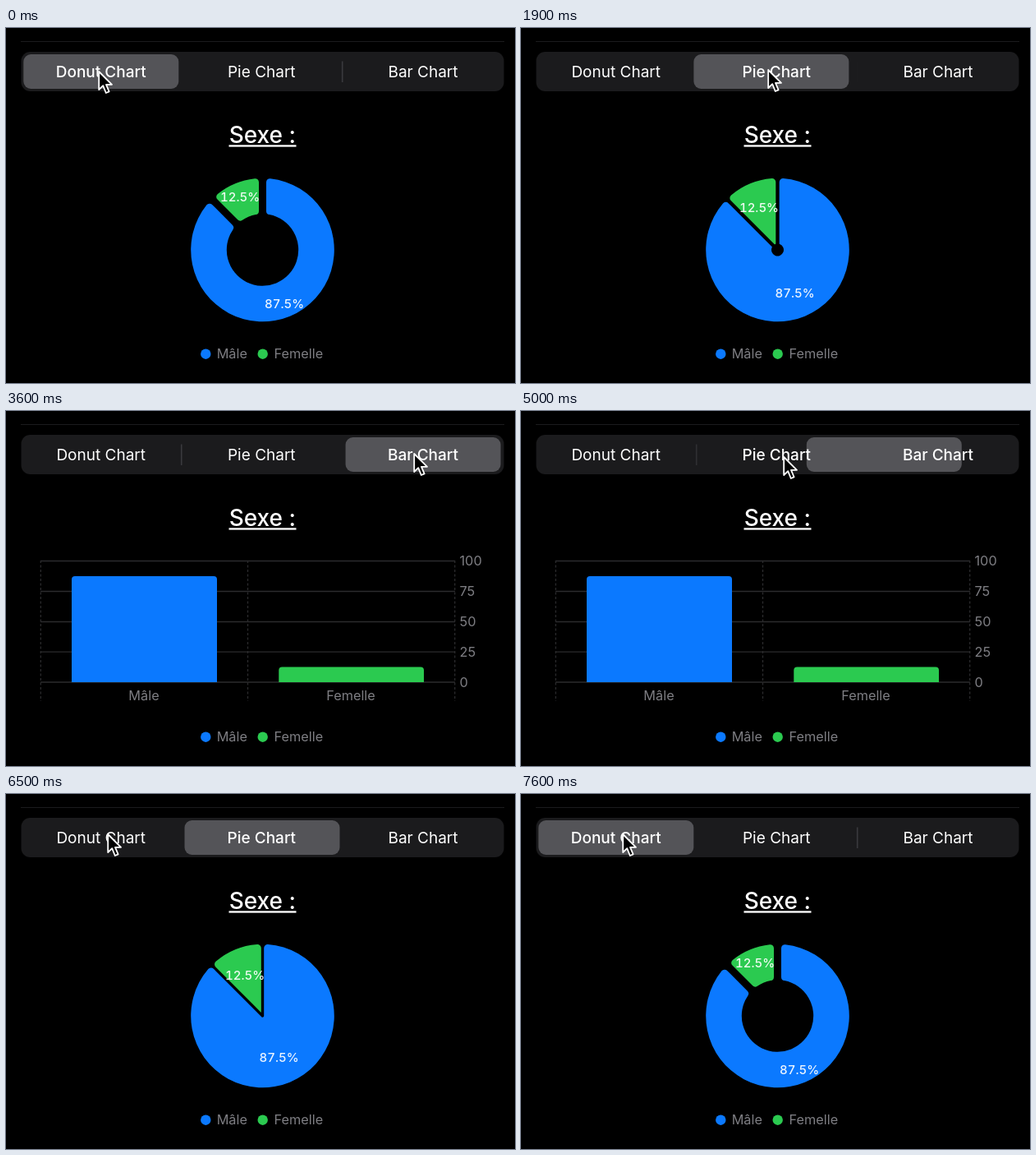
These frames come from a looping animation (620x432 px, 8500 ms). An HTML page:

```html
<!DOCTYPE html>
<html lang="fr">
<head>
<meta charset="utf-8">
<title>Chart picker</title>
<style>
  html, body { margin: 0; width: 100%; height: 100%; overflow: hidden; background: #000; }
  svg { display: block; width: 620px; height: 432px; font-family: Inter, Roboto, sans-serif; }
  text { text-anchor: middle; fill: #fff; }
  .tab { font-size: 19px; }
  .title { font-size: 28px; font-weight: 500; }
  .value { font-size: 15px; font-weight: 500; font-variant-numeric: tabular-nums; fill-opacity: .92; }
  .note { font-size: 16.3px; fill: #7e7e83; }
  .left { text-anchor: start; }
  .grid { stroke: #2b2b2d; stroke-width: 1.3; fill: none; }
  .dash { stroke-dasharray: 3 2.5; }
  .blue { fill: #0b79ff; }
  .green { fill: #2bca50; }
</style>
</head>
<body>
<svg viewBox="0 0 620 432">
  <rect width="620" height="432"/>
  <path d="M18 16.5H607" stroke="#1b1b1d"/>
  <rect x="18.5" y="29" width="588" height="48" rx="11" fill="#1b1b1d"/>
  <g stroke="#3a3a3e" stroke-width="1.6">
    <path id="divLeft" d="M213.7 40.5V66"/>
    <path id="divRight" d="M409.7 40.5V66"/>
  </g>
  <rect id="pill" y="32" width="189" height="42" rx="9" fill="#545458"/>
  <text class="tab" x="115.7" y="60">Donut Chart</text>
  <text class="tab" x="311.3" y="60">Pie Chart</text>
  <text class="tab" x="508" y="60">Bar Chart</text>

  <text class="title" x="312.3" y="139.5">Sexe :</text>
  <rect x="271.5" y="142.3" width="82" height="2.3" fill="#fff"/>

  <g id="bars">
    <path class="grid" d="M42 182.5H547M42 219.5H547M42 256.5H547M42 293.2H547M42 330H547"/>
    <path class="grid dash" d="M42.3 182V353M294.5 182V353M546.7 182V353"/>
    <path class="blue" d="M80 330V205q0-4 4-4H253q4 0 4 4V330z"/>
    <path class="green" d="M332.3 330V315.5q0-4 4-4H505q4 0 4 4V330z"/>
    <g class="note">
      <text class="note left" x="552.5" y="188.4">100</text>
      <text class="note left" x="552.5" y="225.2">75</text>
      <text class="note left" x="552.5" y="262.1">50</text>
      <text class="note left" x="552.5" y="299">25</text>
      <text class="note left" x="552.5" y="335.8">0</text>
    </g>
    <text class="note" x="168" y="351.5">Mâle</text>
    <text class="note" x="420" y="351.5">Femelle</text>
  </g>

  <g id="round">
    <path id="male" class="blue"/>
    <path id="female" class="green"/>
    <text id="maleValue" class="value">87.5%</text>
    <text id="femaleValue" class="value">12.5%</text>
  </g>

  <circle class="blue" cx="243.3" cy="396.7" r="6.2"/>
  <text class="note" x="275.3" y="402.3">Mâle</text>
  <circle class="green" cx="312.7" cy="396.7" r="6.2"/>
  <text class="note" x="356.4" y="402.3">Femelle</text>

  <path id="cursor" d="M1.2 2V24L6.2 19.2L9.8 28L13.6 26.4L10 17.8H17z"
    fill="#000" stroke="#fff" stroke-width="1.8" stroke-linejoin="round"/>
</svg>
<script>
  const LOOP = 8500;
  const CX = 312.5, CY = 270, R = 87.3, HOLE = 43.7, CORNER = 4.5;
  const $ = id => document.getElementById(id);
  const tabs = [...document.querySelectorAll('.tab')];
  const mix = (a, b, p) => a + (b - a) * p;

  const ease = (t, start, len) => {
    const p = Math.min(1, Math.max(0, (t - start) / len));
    return p * p * (3 - 2 * p);
  };
  const spring = (t, start) => {
    const s = Math.max(0, t - start) * 0.023;
    return 1 - Math.exp(-s) * (1 + s);
  };

  // Selected segment: [time, index]
  const taps = [[1678, 1], [3180, 2], [4949, 1], [6850, 0]];
  // Pointer travel: [start, end, x, y]
  const home = [112, 51];
  const trips = [
    [430, 1320, 300, 49],
    [2350, 3080, 496, 50],
    [3930, 4690, 319, 54],
    [5740, 6490, 123, 47]
  ];

  function selection(t) {
    let at = 0, pos = 0;
    for (const [start, to] of taps) {
      pos += (to - at) * spring(t, start);
      at = to;
    }
    return pos;
  }

  function pointer(t) {
    let [x, y] = home;
    for (const [start, end, toX, toY] of trips) {
      const p = ease(t, start, end - start);
      x = mix(x, toX, p);
      y = mix(y, toY, p);
    }
    return [x, y];
  }

  const polar = (r, a) =>
    (CX + r * Math.sin(a)).toFixed(2) + ' ' + (CY - r * Math.cos(a)).toFixed(2);

  // Ring sector with parallel gaps and rounded corners
  function sector(a0, a1, hole, gap, inner) {
    const half = (a1 - a0) / 2;
    const ri = Math.max(hole, gap);
    const side = (a, dir, len) => polar(Math.hypot(len, gap), a + dir * Math.atan2(gap, len));
    const fillet = (rad, c) => ({
      turn: Math.asin(Math.min(1, (gap + c) / rad)),
      len: Math.sqrt(Math.max(0, rad * rad - (gap + c) ** 2))
    });
    const arc = (r, big, sweep, to) => `A${r} ${r} 0 ${+big} ${sweep} ${to}`;
    const o = fillet(R - CORNER, CORNER);
    const n = fillet(ri + inner, inner);
    const rim = arc(CORNER, false, 1, polar(R, a0 + o.turn)) +
      arc(R, half - o.turn > Math.PI / 2, 1, polar(R, a1 - o.turn)) +
      arc(CORNER, false, 1, side(a1, -1, o.len));
    const start = side(a0, 1, o.len);
    if (n.turn >= half) {
      return `M${polar(gap / Math.sin(half), a0 + half)}L${start}${rim}Z`;
    }
    const foot = side(a0, 1, n.len);
    return `M${foot}L${start}${rim}L${side(a1, -1, n.len)}` +
      arc(inner, false, 1, polar(ri, a1 - n.turn)) +
      arc(ri, half - n.turn > Math.PI / 2, 0, polar(ri, a0 + n.turn)) +
      arc(inner, false, 1, foot) + 'Z';
  }

  function place(id, x, y) {
    $(id).setAttribute('x', x);
    $(id).setAttribute('y', y + 5.4);
  }

  function draw(t) {
    const pos = selection(t);
    $('pill').setAttribute('x', 21.3 + 196.2 * pos);
    tabs.forEach((tab, i) => {
      tab.style.fontWeight = Math.abs(pos - i) < 0.7 ? 500 : 400;
    });
    $('divLeft').style.opacity = Math.max(0, pos - 1);
    $('divRight').style.opacity = Math.max(0, 1 - pos);

    const ring = 1 - ease(t, 1643, 350) + ease(t, 6890, 350);
    const hole = HOLE * ring, gap = mix(1.7, 4.5, ring), inner = CORNER * ring;
    const cut = Math.PI * 1.75;
    $('male').setAttribute('d', sector(0, cut, hole, gap, inner));
    $('female').setAttribute('d', sector(cut, Math.PI * 2, hole, gap, inner));
    place('maleValue', mix(332.5, 339, ring), mix(320.5, 335.5, ring));
    place('femaleValue', mix(291, 285, ring), mix(221, 206, ring));

    const bar = ease(t, 3230, 350) - ease(t, 5030, 350);
    $('bars').style.opacity = bar * bar;
    $('round').style.opacity = 1 - bar;

    const [x, y] = pointer(t);
    $('cursor').setAttribute('transform', `translate(${x} ${y})`);
  }

  function tick() {
    draw(performance.now() % LOOP);
    requestAnimationFrame(tick);
  }
  tick();
</script>
</body>
</html>
```
